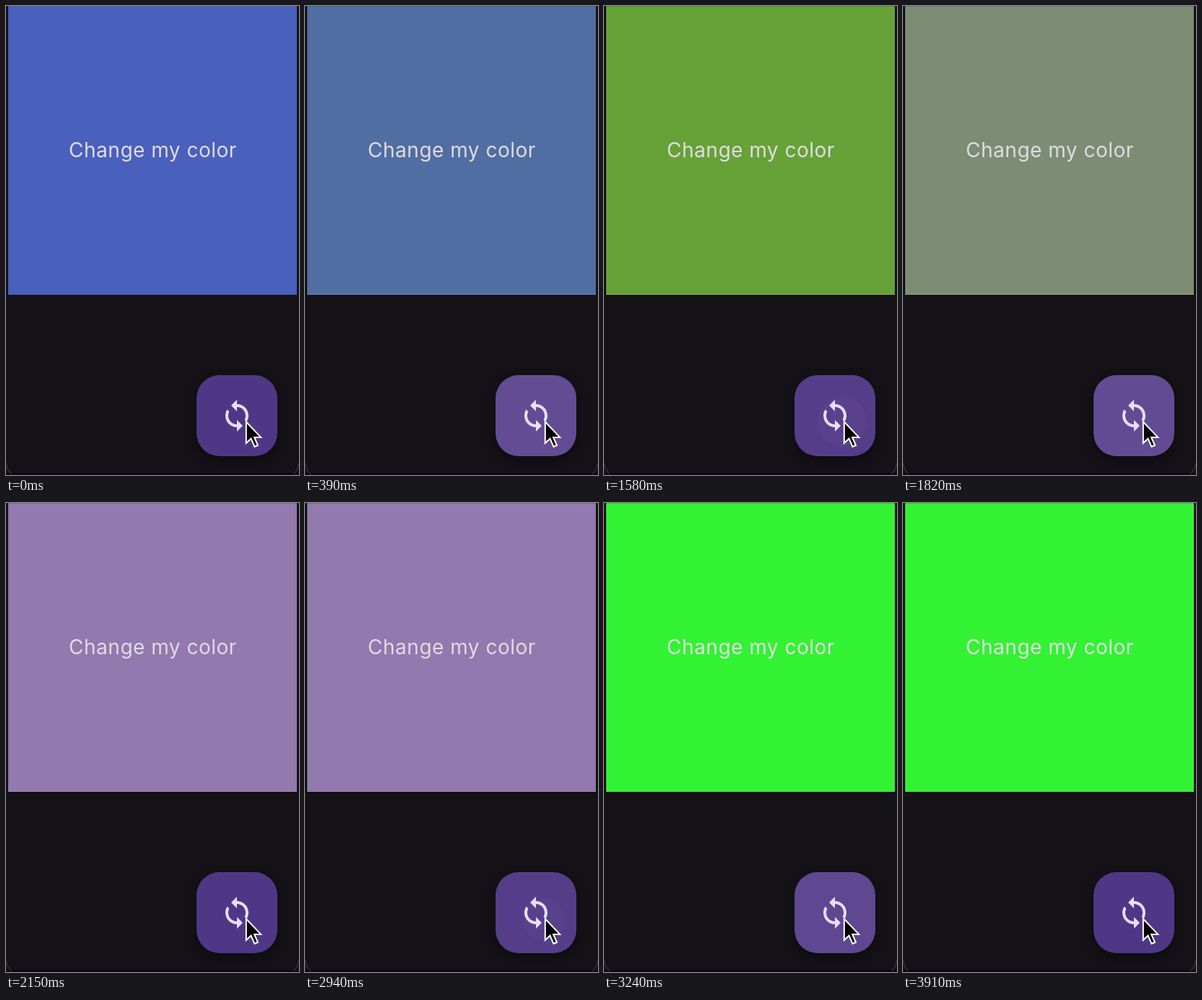
These frames come from a looping animation (406x648 px, 3940 ms). An HTML page:

```html
<!DOCTYPE html>
<html lang="en">
<head>
<meta charset="utf-8">
<title>Change my color</title>
<style>
  html, body { margin: 0; width: 100%; height: 100%; overflow: hidden; background: #141217; }
  svg { display: block; width: 406px; height: 648px; }
  text { font: 28px Inter, "Open Sans", sans-serif; letter-spacing: .5px; }
  .button { filter: drop-shadow(0 5px 7px rgba(0, 0, 0, .4)); }
</style>
</head>
<body>
<svg viewBox="0 0 406 648">
  <defs>
    <clipPath id="buttonClip"><rect x="264" y="510" width="112" height="112" rx="32"/></clipPath>
  </defs>
  <rect width="406" height="648" fill="#141217"/>
  <path d="M0 645.5H406V648H0z" fill="#0c0511"/>
  <path d="M.5 632Q1.5 642 8 647M405.5 632Q404.5 642 398 647" fill="none" stroke="#37343d" stroke-width="1.3"/>

  <rect id="box" x="3" width="400" height="399"/>
  <g id="edges">
    <path d="M3 0h400v1H3z" fill="#000" opacity=".15"/>
    <path d="M3 398h400v1H3z" fill="#fff" opacity=".15"/>
  </g>
  <text x="203.5" y="209" text-anchor="middle" fill="#e2dbe3">Change my color</text>

  <rect class="button" x="264" y="510" width="112" height="112" rx="32" fill="#503785"/>
  <g clip-path="url(#buttonClip)" fill="#eaddff">
    <rect id="highlight" x="264" y="510" width="112" height="112"/>
    <circle id="ripple"/>
  </g>
  <path transform="translate(296 542) scale(2)" fill="#eaddff" d="M12 4V1L8 5l4 4V6c3.31 0 6 2.69 6 6 0 1.01-.25 1.97-.7 2.8l1.46 1.46C19.54 15.03 20 13.57 20 12c0-4.42-3.58-8-8-8zm0 14c-3.31 0-6-2.69-6-6 0-1.01.25-1.97.7-2.8L5.24 7.74C4.46 8.97 4 10.43 4 12c0 4.42 3.58 8 8 8v3l4-4-4-4v3z"/>
  <path d="M332.8 574.5V604l6.7-6.3 4.9 11.3 4.6-2-4.9-11.1h9.1z" fill="#000" stroke="#fff" stroke-width="2"/>
</svg>
<script>
  const LOOP = 3940;
  const START_COLOR = [74, 96, 189];
  const TAPS = [
    { down: 260, up: 350, color: [102, 162, 56] },
    { down: 1560, up: 1720, color: [146, 121, 174] },
    { down: 2930, up: 3010, color: [51, 242, 51] }
  ];
  const [box, edges, highlight, ripple] =
    ["box", "edges", "highlight", "ripple"].map(id => document.getElementById(id));

  const progress = (t, start, length) => Math.min(1, Math.max(0, (t - start) / length));
  const lerp = (a, b, k) => a + (b - a) * k;
  const easeOut = k => 1 - (1 - k) ** 2;

  function draw(t) {
    let color = START_COLOR;
    let press = 0, splash = 0, spread = 0;

    for (const tap of TAPS) {
      if (t < tap.down) break;
      const k = progress(t, tap.up, 200);
      color = color.map((c, i) => lerp(c, tap.color[i], k));
      press = .035 * (1 - k);
      splash = .1 * progress(t, tap.down, 75) * (1 - progress(t, tap.up + 225, 150));
      spread = easeOut(progress(t, tap.down, 225));
    }

    box.setAttribute("fill", `rgb(${color.map(Math.round)})`);
    edges.setAttribute("opacity", t < TAPS[0].down ? 0 : 1);
    highlight.setAttribute("opacity", press);
    ripple.setAttribute("opacity", splash);
    ripple.setAttribute("cx", lerp(332, 320, spread));
    ripple.setAttribute("cy", lerp(576, 566, spread));
    ripple.setAttribute("r", lerp(24, 80, spread));
  }

  const begin = performance.now();
  function tick() {
    draw((performance.now() - begin) % LOOP);
    requestAnimationFrame(tick);
  }
  tick();
</script>
</body>
</html>
```
